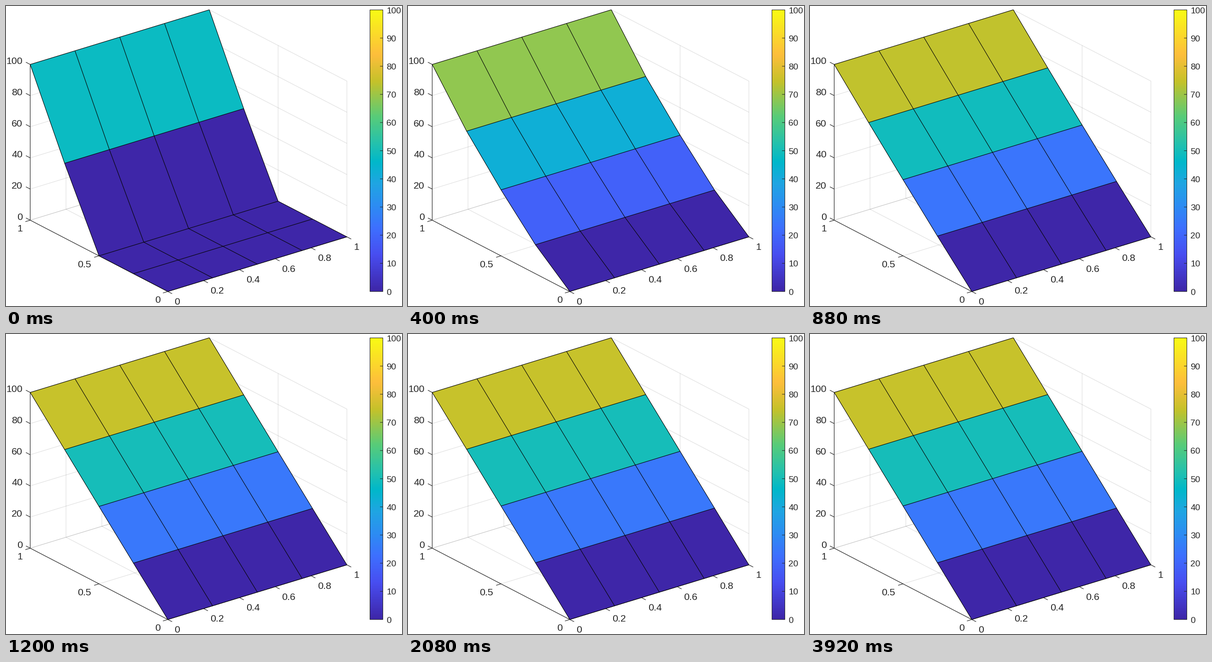
These frames come from a looping animation (859 px wide and 652 px high, 4000 ms). A matplotlib script:

```python
import numpy as np
import matplotlib.pyplot as plt
from matplotlib.animation import FuncAnimation
from matplotlib.collections import LineCollection, PolyCollection
from matplotlib.colors import LinearSegmentedColormap

W, H, DPI = 859, 652, 64
PX = 72 / DPI
FRAMES, INTERVAL = 50, 80
N = 4            # grid cells per side
R = 0.48         # diffusion number of the explicit scheme
INK = "#262626"

# Screen projection of the unit box
ORIGIN = np.array([351.0, 620.5])
EX = np.array([388.5, -118.8])
EY = np.array([-298.5, -155.0])
EZ = np.array([0.0, -3.385])

STOPS = {0: "#3e26a8", 8: "#484df0", 14: "#3e6fff", 19: "#2d8cf3",
         24: "#20a5e3", 29: "#01b8ca", 33: "#24c1ae", 39: "#57cc7a",
         47: "#c5c22a", 53: "#febe3c", 63: "#f9fb15"}
CMAP = LinearSegmentedColormap.from_list(
    "heat", [(k / 63, color) for k, color in STOPS.items()], N=256)

plt.rcParams["font.family"] = "Liberation Sans"
fig = plt.figure(figsize=(W / DPI, H / DPI), dpi=DPI, facecolor="white")
ax = fig.add_axes([0, 0, 1, 1])
ax.axis("off")


def project(x, y, z=0):
    return ORIGIN + x * EX + y * EY + z * EZ


def lines(segments, color, width, z, alpha=1):
    group = LineCollection(segments, colors=color, alpha=alpha,
                           linewidths=width * PX, zorder=z)
    group.set_snap(False)
    return ax.add_collection(group, autolim=False)


def label(pos, text, ha, size=21.2):
    x, y = pos
    ax.text(x, y + 0.355 * size, text, ha=ha, va="baseline",
            fontsize=size * PX, color=INK)


def draw_box():
    xs, ys, zs = np.arange(6) / 5, np.arange(3) / 2, np.arange(6) * 20
    grid = []
    for x in xs:
        grid += [(project(x, 0), project(x, 1)),
                 (project(x, 1), project(x, 1, 100))]
    for y in ys:
        grid += [(project(0, y), project(1, y)),
                 (project(1, y), project(1, y, 100))]
    for z in zs:
        grid += [(project(0, 1, z), project(1, 1, z)),
                 (project(1, 0, z), project(1, 1, z))]
    lines(grid, INK, 1.1, 1, 0.15)

    along_x = EX / np.hypot(*EX) * 11
    along_y = EY / np.hypot(*EY) * 10.5
    axes = [(project(0, 0), project(1, 0)), (project(0, 0), project(0, 1)),
            (project(0, 1), project(0, 1, 100))]
    for x in xs:
        p = project(x, 0)
        axes.append((p, p - along_y))
        label(p + (14.5, 20.8), f"{x:g}", "left")
    for y in ys:
        p = project(0, y)
        axes.append((p, p - along_x))
        label(p + (-16.5, 17.3), f"{y:g}", "right")
    for z in zs:
        p = project(0, 1, z)
        axes.append((p, p + along_y))
        label(p + (-16.5, -8.2), f"{z}", "right")
    lines(axes, INK, 1.2, 2)


def draw_colorbar():
    left, right, top, bottom = 789.5, 817.5, 8.5, 620.5
    ax.imshow(np.linspace(100, 0, 256)[:, None], cmap=CMAP, aspect="auto",
              extent=(left, right, bottom, top), interpolation="nearest")
    edge = [(left, top), (right, top), (right, bottom), (left, bottom),
            (left, top)]
    ticks = []
    for v in range(0, 101, 10):
        y = bottom + (top - bottom) * v / 100
        ticks.append([(right - 6, y), (right, y)])
        label((825.3, y + 0.4), f"{v}", "left", 19.1)
    lines([edge] + ticks, INK, 1.1, 3)


def heat_history():
    u = np.zeros(N + 1)
    u[-1] = 100
    history = []
    for _ in range(FRAMES):
        u[1:-1] += R * (u[:-2] - 2 * u[1:-1] + u[2:])
        history.append(u.copy())
    return history


history = heat_history()
draw_box()
draw_colorbar()
ax.set_xlim(0, W)
ax.set_ylim(H, 0)
faces = PolyCollection([], edgecolors="none", zorder=4)
ax.add_collection(faces, autolim=False)
wires = lines([], "black", 1.1, 5)


def update(frame):
    u = history[frame]
    t = np.arange(N + 1) / N
    p = np.array([[project(x, y, z) for x in t] for y, z in zip(t, u)])
    faces.set_verts([(p[j, i], p[j, i + 1], p[j + 1, i + 1], p[j + 1, i])
                     for j in range(N) for i in range(N)])
    faces.set_facecolor(CMAP(np.repeat(u[:-1], N) / 100))
    wires.set_segments([*p, *p.swapaxes(0, 1)])
    return faces, wires


anim = FuncAnimation(fig, update, frames=FRAMES, interval=INTERVAL,
                     repeat=True, repeat_delay=0)
plt.show()
```
